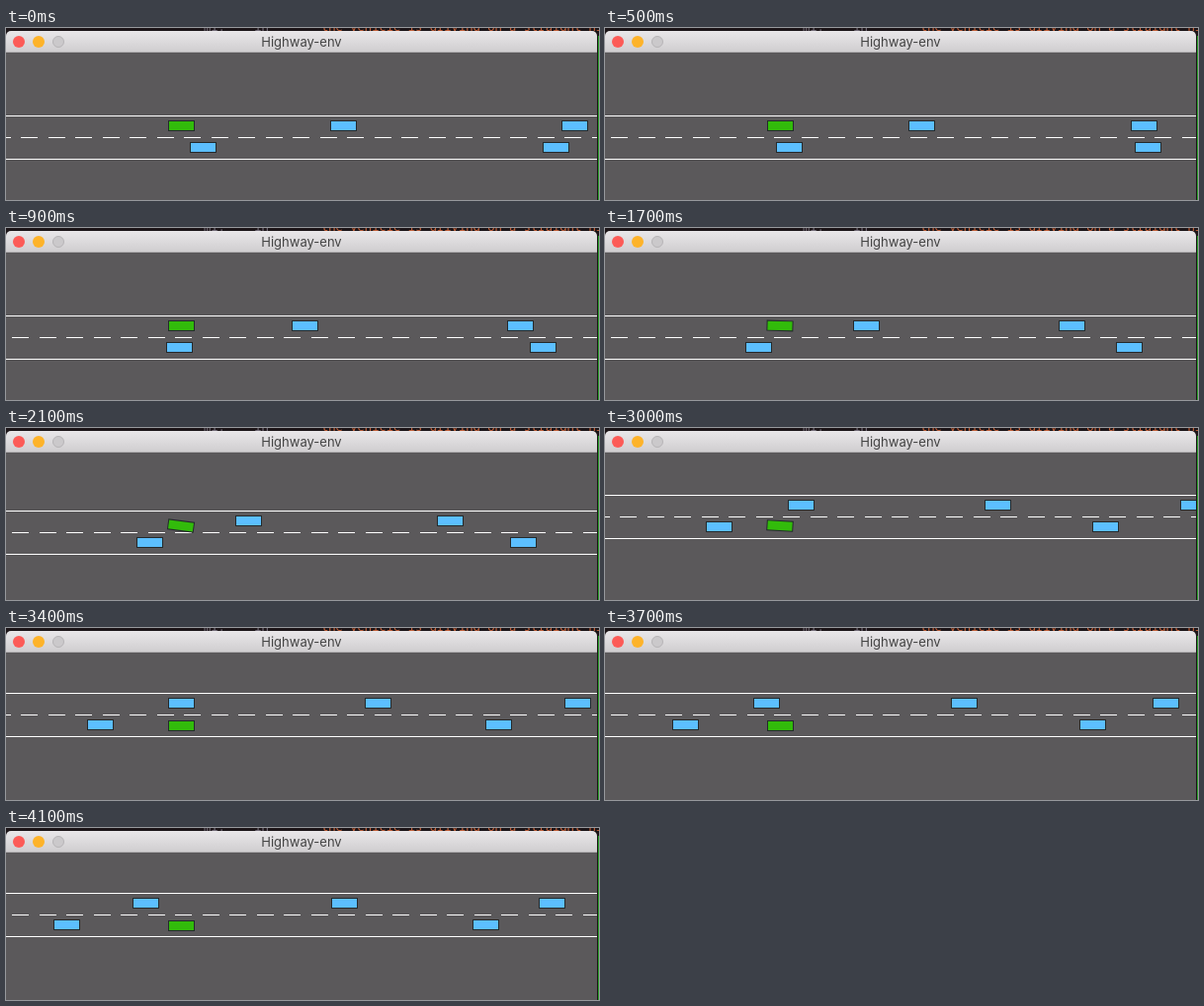
An HTML page with a canvas for the animation above (4200 ms loop, 600x175 px).

```html
<!DOCTYPE html>
<html lang="en">
<head>
<meta charset="utf-8">
<title>Highway-env</title>
<style>
  html, body { margin: 0; width: 100%; height: 100%; overflow: hidden; background: #1c1518; }
  body { position: relative; }
  .behind { position: absolute; top: -9px; font: 12.2px/16px "Noto Sans Mono", monospace; white-space: pre; color: #77707c; }
  .comment { color: #c8643c; }
  .edge { position: absolute; left: 599px; top: 8px; width: 1px; height: 167px; background: #279a27; }
  .bar {
    position: absolute; left: 0; top: 3px; width: 598px; height: 22px; box-sizing: border-box;
    border-radius: 5px 5px 0 0; border-bottom: 1px solid #b4b2b4;
    background: linear-gradient(#e9e7e9, #d0ced0);
    font: 13px/23px Inter, sans-serif; color: #444; text-align: center;
  }
  .bar i { position: absolute; top: 5px; width: 12px; height: 12px; border-radius: 50%; box-sizing: border-box; }
  canvas { position: absolute; left: 0; top: 25px; }
</style>
</head>
<body>
<div class="behind" style="left:200px">mi:    in</div>
<div class="behind comment" style="left:319px">the vehicle is driving on a straight hi</div>
<div class="edge"></div>
<div class="bar">
  <i style="left:7px;background:#fc5b57"></i>
  <i style="left:27px;background:#fdb32a"></i>
  <i style="left:47px;background:#cbc9cb;border:1px solid #b7b5b7"></i>
  Highway-env
</div>
<canvas width="598" height="150"></canvas>
<script>
const ctx = document.querySelector('canvas').getContext('2d');
const WIDTH = 598, LANE = 22, STRIPE_GAP = 27.5, STRIPE = 17;
const EGO_STEP = 27.5 / 3; // road pixels per simulation step

// Lane change: [step, sideways shift in px, heading in degrees]
const laneChange = [
  [24, 0, 0], [27, 1.4, 5], [31, 5, 7.5], [36, 12.3, 8.3],
  [39, 16, 8], [45, 21.3, 3.5], [51, 23, 0]
];

// Distance lost to the ego car: drift * n + curve * n^2
const traffic = [
  { lane: 0, x: 328, drift: 2.93, curve: 0.0056 },
  { lane: 0, x: 562, drift: 4.32, curve: -0.0083 },
  { lane: 0, x: 728.7, drift: 3.72, curve: -0.01 },
  { lane: 1, x: 186, drift: 1.9, curve: -0.005, brakeAt: 37 },
  { lane: 1, x: 543, drift: 0.98, curve: 0.0029 }
];

function sample(keys, n, column) {
  const next = keys.findIndex(key => key[0] > n);
  if (next === 0) return keys[0][column];
  if (next < 0) return keys[keys.length - 1][column];
  const a = keys[next - 1], b = keys[next];
  return a[column] + (b[column] - a[column]) * (n - a[0]) / (b[0] - a[0]);
}

function carX(car, n) {
  const braking = Math.max(0, n - car.brakeAt || 0);
  const lost = 2.15 * (braking - 5 * (1 - Math.exp(-braking / 5)));
  return Math.round(car.x - car.drift * n - car.curve * n * n - lost);
}

function drawCar(x, y, color, degrees = 0) {
  ctx.save();
  ctx.translate(x + 13.5, y + 5.5);
  ctx.rotate(degrees * Math.PI / 180);
  ctx.fillStyle = '#242a2c';
  ctx.fillRect(-13.5, -5.5, 27, 11);
  ctx.fillStyle = color;
  ctx.fillRect(-12.5, -4.5, 25, 9);
  ctx.restore();
}

function draw(n) {
  const top = 64 - Math.round(sample(laneChange, n, 1));
  ctx.fillStyle = '#5b595b';
  ctx.fillRect(0, 0, WIDTH, 150);

  ctx.fillStyle = '#fff';
  ctx.fillRect(0, top, WIDTH, 1);
  ctx.fillRect(0, top + 2 * LANE, WIDTH, 1);
  const first = (15.2 - n * EGO_STEP) % STRIPE_GAP - STRIPE_GAP;
  for (let x = first; x < WIDTH; x += STRIPE_GAP)
    ctx.fillRect(Math.round(x), top + LANE, STRIPE, 1);

  for (const car of traffic)
    drawCar(carX(car, n), top + 5 + car.lane * LANE, '#5cbfff');
  drawCar(164 - (n > 24 && n < 50 ? 0.5 : 0), 69, '#32bb0b', sample(laneChange, n, 2));
}

function tick() {
  const shot = Math.floor(performance.now() % 4200 / 100);
  draw(Math.floor(shot * 1.5)); // 15 steps per second seen at 10 pictures per second
  requestAnimationFrame(tick);
}
tick();
</script>
</body>
</html>
```
